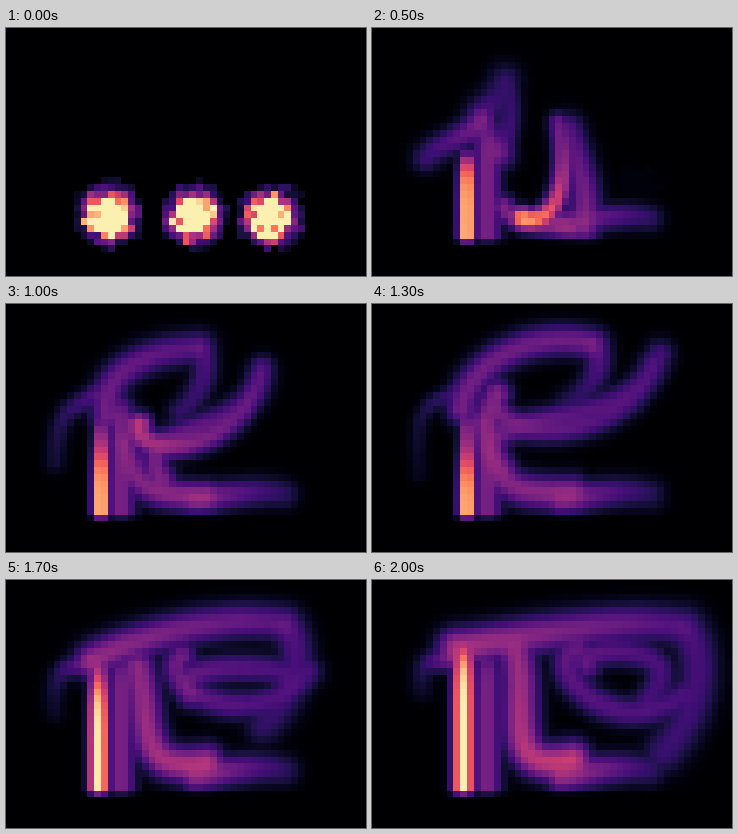
Write a matplotlib script that moves like this. It is 360 by 248 pixels and loops after 2.1 s.

```python
import numpy as np
import matplotlib.pyplot as plt
from matplotlib.animation import FuncAnimation

W, H, DPI = 360, 248, 100
COLS, ROWS = 53, 37
CELL = W / COLS
FRAMES, STEP = 21, 100
RISE, CURL, END = 500, 1300, 2000
BLOBS = [(103, 187), (188, 188), (265, 189)]

X, Y = np.meshgrid((np.arange(COLS) + 0.5) * CELL, (np.arange(ROWS) + 0.5) * CELL)


def blend(t, a, b, c):
    """Move from a through b to c, each leg starting a little faster."""
    a, b, c = (np.asarray(v, float) for v in (a, b, c))
    if t <= CURL:
        return a + (b - a) * (max(t - RISE, 0) / (CURL - RISE)) ** 0.8
    return b + (c - b) * ((t - CURL) / (END - CURL)) ** 0.8


def plume(t, blob, path, heat, width):
    """Glow along a curve; path, heat and width each have three poses."""
    pts = blend(t, *path)
    origin = np.array(BLOBS[blob])
    pts = origin + (pts - origin) * (0.3 + 0.7 * min(t / RISE, 1))
    u = np.linspace(0, 1, 40)
    fit = np.polyfit(np.linspace(0, 1, len(pts)), pts, len(pts) - 1)
    x, y = (np.polyval(c, u)[:, None, None] for c in fit.T)
    h0, h1 = blend(t, *heat)
    h = (h0 + (h1 - h0) * u)[:, None, None]
    d2 = ((X - x) ** 2 + (Y - y) ** 2) / blend(t, *width) ** 2
    return (h * np.exp(-d2)).max(axis=0)


def column(t):
    """Hot jet at the left, with a front that sinks and then climbs."""
    late = blend(t, 0, 0, 1)
    front = blend(t, 135, 157, 75)
    top = blend(t, 125, 110, 62)
    grow = min(t / RISE, 1)
    front, top = (190 + (v - 190) * grow for v in (front, top))
    heat = 0.42 + 0.55 / (1 + np.exp((front - Y) / 11))
    across = np.exp(-((X - 95 + 3.4 * late) / (8 + 2.5 * late)) ** 2)
    return heat * across / (1 + np.exp((top - Y) / 5))


def sheath(t):
    """Cooler layer to the right of the jet."""
    top = 190 + (blend(t, 105, 90, 75) - 190) * min(t / RISE, 1)
    return 0.36 * np.exp(-((X - 115) / 15) ** 2) / (1 + np.exp((top - Y) / 6))


FLOOR = [(190, 195), (220, 191), (250, 188), (278, 190)]
PLUMES = {
    "hook": (0, ([(110, 92), (90, 108), (72, 117), (54, 130)],
                 [(80, 90), (60, 100), (48, 120), (47, 170)],
                 [(85, 75), (70, 80), (55, 85), (50, 110)]),
             [(.34, .2), (.2, .06), (.4, .08)], (15, 10, 13)),
    "arch": (0, ([(125, 125), (110, 92), (118, 78), (133, 52)],
                 [(90, 105), (112, 65), (160, 40), (220, 40)],
                 [(85, 68), (150, 57), (240, 45), (312, 48)]),
             [(.33, .16), (.34, .32), (.48, .24)], (18, 17, 20)),
    "cap": (0, ([(133, 52), (138, 75), (136, 100), (128, 125)],
                [(220, 40), (226, 58), (218, 80), (195, 100)],
                [(312, 48), (326, 85), (318, 130), (292, 172)]),
            [(.16, .24), (.3, .15), (.24, .2)], (13, 15, 22)),
    "arm": (1, ([(150, 190), (176, 184), (190, 150), (186, 95)],
                [(125, 90), (150, 122), (225, 116), (288, 50)],
                [(205, 68), (200, 100), (245, 130), (310, 115)]),
            [(.85, .3), (.38, .22), (.3, .24)], (11, 15, 16)),
    "wake": (1, ([(212, 198), (212, 165), (206, 135), (196, 102)],
                 [(130, 165), (140, 125), (220, 105), (280, 60)],
                 [(215, 85), (235, 72), (280, 80), (275, 120)]),
             [(.38, .26), (.36, .22), (.3, .22)], (17, 15, 16)),
    "leg": (1, ([(132, 178), (145, 191), (168, 196), (198, 200)],
                [(112, 120), (125, 165), (150, 185), (200, 189)],
                [(143, 70), (148, 125), (155, 170), (200, 180)]),
            [(.36, .42), (.36, .4), (.42, .55)], (12, 18, 19)),
    "floor": (2, (FLOOR,) * 3, [(.38, .18), (.38, .16), (.45, .18)], (14, 16, 17)),
}


def ignition(t):
    """Ragged starting blobs that quickly fade."""
    rng = np.random.default_rng(4)
    heat = sum(2.3 * np.exp(-((X - x) ** 2 + (Y - y + 0.06 * t) ** 2) / 18.5 ** 2)
               for x, y in BLOBS)
    heat = heat * np.exp(rng.normal(0, 0.4, X.shape))
    heat[heat < 0.06] = 0
    return np.minimum(heat, 0.97) * np.exp(-t / 130)


def field(t):
    start = ignition(t)
    if t == 0:
        return start
    parts = [column(t), sheath(t)] + [plume(t, *p) for p in PLUMES.values()]
    heat = sum(p ** 5 for p in parts) ** 0.2
    heat[31] *= 0.35
    heat[32:] = 0
    return np.maximum(heat * min(1, 0.4 + t / 400), start)


fig = plt.figure(figsize=(W / DPI, H / DPI), dpi=DPI, facecolor="black")
ax = fig.add_axes([0, 0, 1, 1])
ax.axis("off")
img = ax.imshow(field(0), cmap="magma", vmin=0, vmax=1, interpolation="nearest",
                extent=(0, W, ROWS * CELL, 0), aspect="auto")
ax.set_xlim(0, W)
ax.set_ylim(H, 0)


def draw(i):
    img.set_data(field(i * STEP))
    return [img]


anim = FuncAnimation(fig, draw, frames=FRAMES, interval=STEP, repeat=True,
                     repeat_delay=0, blit=False)
plt.show()
```
